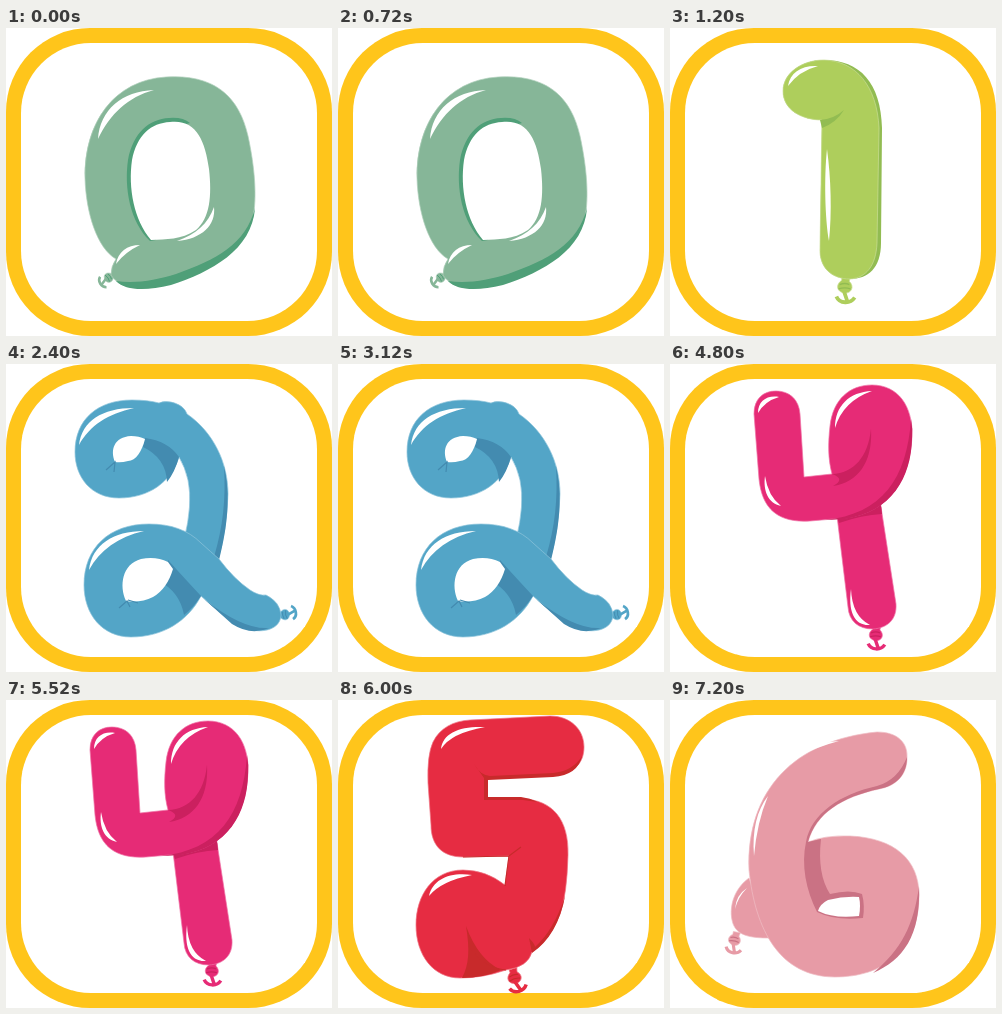
An HTML page for the animation above (8000 ms loop, 326 by 308 pixels).

```html
<!DOCTYPE html>
<html lang="en">
<head>
<meta charset="utf-8">
<title>Balloon digits</title>
<style>
  html, body { margin: 0; width: 100%; height: 100%; overflow: hidden; background: #fff; }
  svg { display: block; width: 326px; height: 308px; }
  .digit { display: none; fill: var(--c); stroke: color-mix(in srgb, var(--c), #fff 35%); stroke-width: .7; }
  .digit.on { display: inline; }
  .shade { fill: var(--d); stroke: none; }
  .white { fill: #fff; stroke: none; }
  .crease { fill: none; stroke: var(--d); stroke-width: 1.2; }
  .hook { fill: none; stroke: var(--c); stroke-width: 3.5; }
</style>
</head>
<body>
<svg viewBox="0 0 326 308">
  <defs>
    <g id="knot">
      <path d="M-3,0 H5 L4,4 C9,9 6,15 0,15 C-8,14 -9,7 -3,3 Z"/>
      <path class="crease" d="M-5,7 Q0,5 4,7 M-6,11 Q0,9 5,11"/>
      <path class="hook" d="M-1,13 L2,22 M-8,18 C-5,25 5,25 9,19"/>
    </g>
  </defs>
  <rect width="326" height="308" rx="84" fill="#ffc51b"/>
  <rect class="white" x="15" y="15" width="296" height="278" rx="70"/>

  <g class="digit" style="--c:#86b698;--d:#4f9f78">
    <use href="#knot" transform="translate(108 246) rotate(55) scale(.72)"/>
    <path d="M160,49 C208,46 233,68 242,108 C249,140 251,170 247,189 C239,222 200,244 165,255 C140,263 115,263 105,247 Q105,238 110,231 C91,220 80,185 79,150 C78,95 108,52 160,49Z"/>
    <path class="shade" d="M249,180 C246,222 205,244 165,257 C140,263 120,263 110,253 C130,256 150,252 170,246 C210,232 240,216 249,180Z"/>
    <path class="shade" d="M144,213 C124,194 118,160 122,132 C127,105 143,91 163,90 Q177,89 184,95 L160,102 L136,140 L150,212Z"/>
    <path class="white" d="M145,212 C128,192 122,160 126,132 C131,107 145,95 164,94 C190,91 199,112 203,141 C206,168 204,190 190,202 C175,212 160,211 145,212Z"/>
    <path class="white" d="M92,111 C94,82 116,63 148,62 C122,69 104,86 92,111Z M208,179 C210,197 196,211 171,213 C190,206 202,196 208,179Z M110,236 C112,224 121,217 134,217 Q119,224 110,236Z"/>
  </g>

  <g class="digit" style="--c:#aece5c;--d:#92bc52">
    <use href="#knot" transform="translate(175 249) scale(1.08)"/>
    <path class="shade" d="M152,92 C132,92 113,82 113,63 C113,45 132,32 154,32 C190,32 211,55 212,100 L211,215 C211,240 198,251 180,251 C162,251 149,240 150,220Z"/>
    <path d="M152,92 C132,92 113,82 113,63 C113,45 132,32 154,32 C186,33 207,58 209,100 L207,215 C206,238 196,250 180,251 C162,251 149,240 150,220Z"/>
    <path class="shade" d="M150,92 Q164,91 174,82 Q166,95 152,100Z"/>
    <path class="white" d="M118,58 C120,44 132,37 148,38 Q129,43 118,58Z M157,121 C161,150 162,185 159,213 C155,190 154,150 157,121Z"/>
  </g>

  <g class="digit" style="--c:#53a5c7;--d:#438bb0">
    <use href="#knot" transform="translate(272 252) rotate(-102) scale(.78)"/>
    <path d="M126,36 Q142,36 153,39 C162,35 178,40 181,50 C207,68 222,98 222,130 Q221,165 211,200 L178,176 Q187,140 182,116 Q179,103 173,93 C165,118 143,134 113,134 C85,134 69,113 69,88 C69,55 92,36 126,36Z"/>
    <path class="shade" d="M218,102 C226,138 219,172 213,196 L208,193 C217,163 220,135 218,102Z"/>
    <path d="M143,160 C165,160 182,166 195,179 Q205,188 213,195 Q228,215 244,226 Q253,232 260,231 Q274,238 275,251 C274,269 249,270 234,262 Q214,250 195,232 C182,257 157,273 125,273 C96,273 78,250 78,221 C78,184 103,160 143,160Z"/>
    <path class="shade" d="M139,74 Q162,77 173,93 Q169,108 161,118 Q160,94 137,83Z M162,196 Q180,216 195,232 Q187,244 178,251 Q174,228 153,217 Q162,208 162,196Z"/>
    <path class="shade" d="M198,235 Q237,266 263,264 Q245,272 226,260Z"/>
    <path class="white" d="M109,98 C104,86 108,73 125,72 Q133,72 139,75 C136,87 130,97 122,97 Q115,99 109,98Z M120,237 C113,222 116,200 135,195 Q150,192 162,198 L167,205 Q161,225 147,233 Q135,239 120,237Z"/>
    <path class="crease" d="M100,106 L109,98 L108,108 M113,244 L121,237 L124,243 M122,236 L132,239"/>
    <path class="white" d="M73,81 C76,57 96,44 128,44 C102,50 84,61 73,81Z M83,206 C86,181 107,167 138,167 C112,173 94,186 83,206Z"/>
  </g>

  <g class="digit" style="--c:#96d6e6;--d:#7bc9df">
    <use href="#knot" transform="translate(107 212) rotate(142) scale(.75)"/>
    <path d="M171,180 L206,137 C213,150 215,165 215,185 V205 C215,240 190,253 155,253 C125,253 102,243 102,223 C102,211 110,203 127,205 Q145,210 160,209 C170,208 171,202 171,180Z"/>
    <path class="shade" d="M110,240 C145,254 185,249 214,217 C206,244 184,253 155,253 Q124,252 110,240Z M170,179 L207,137 Q211,143 212,150 Q198,173 170,182Z"/>
    <path d="M125,93 C112,92 101,82 101,69 C101,52 118,42 150,42 C190,40 208,52 209,85 L207,130 C204,160 178,187 143,187 C120,187 106,172 106,152 C106,128 122,110 152,110 L164,111 C164,95 163,88 152,87 C142,87 136,93 125,93Z"/>
    <path class="shade" d="M207,70 Q210,85 207,130 C204,160 178,187 143,187 Q125,187 114,175 C150,192 195,170 204,128 Q207,100 207,70Z M139,144 Q158,140 169,123 Q162,143 139,144Z"/>
    <path class="white" d="M104,68 C105,53 119,46 142,47 Q116,51 104,68Z M111,141 C113,124 129,115 153,116 Q122,123 111,141Z M106,218 C110,206 124,204 140,210 Q119,210 106,218Z"/>
  </g>

  <g class="digit" style="--c:#e62b76;--d:#cb205f">
    <use href="#knot" transform="translate(206 262) scale(.98)"/>
    <path d="M167,152 L211,143 L226,240 C227,255 218,264 203,265 C188,265 179,257 178,243Z"/>
    <path class="shade" d="M167,152 L211,140 L212,150 Q192,151 169,159Z"/>
    <path d="M84,50 C84,35 93,27 106,27 C120,27 129,36 130,50 L134,113 L162,110 C158,95 158,80 160,62 C163,35 180,21 202,21 C228,21 243,42 242,72 C240,113 222,148 175,154 L140,157 C108,159 92,145 89,115Z"/>
    <path class="shade" d="M241,55 Q243,65 242,75 C241,113 222,148 175,155 L155,156 C212,150 237,115 241,55Z"/>
    <path class="shade" d="M162,110 C184,109 198,93 201,65 C203,99 187,119 163,122 Q176,115 162,110Z"/>
    <path class="white" d="M88,49 C88,37 97,31 109,33 Q95,37 88,49Z M165,64 C165,42 179,28 202,27 Q173,37 165,64Z M95,112 Q98,132 111,142 C98,139 93,127 95,112Z M181,225 Q182,252 200,261 C184,262 178,247 181,225Z"/>
  </g>

  <g class="digit" style="--c:#e62c42;--d:#c82a2b">
    <use href="#knot" transform="translate(174 269) rotate(-17)"/>
    <path d="M132,20 L212,16 C232,16 246,29 246,47 C246,65 234,74 215,75 L148,78 V99 H185 C215,100 231,120 230,155 Q229,195 222,214 Q212,240 194,252 Q190,267 168,270 Q145,278 122,278 C95,278 78,255 78,225 C78,195 95,170 125,170 Q148,170 167,185 L171,156 L125,157 C105,157 93,146 93,125 L90,83 Q89,55 95,42 C102,28 115,21 132,20Z"/>
    <path class="shade" d="M136,64 Q142,75 152,76 L215,73 Q235,71 244,56 Q240,75 215,77 L150,80 V97 H183 Q192,98 200,102 Q192,101 185,100 H146 V78Z"/>
    <path class="shade" d="M128,226 C132,250 131,265 124,278 Q145,278 163,270 Q140,259 128,226Z M227,196 Q220,235 194,253 L191,238 Q197,244 197,247 Q216,230 227,196Z"/>
    <path class="crease" d="M125,157 L171,156 L183,147 M171,156 L167,186 M134,250 Q147,268 168,270"/>
    <path class="white" d="M103,49 C105,33 121,26 147,27 Q113,33 103,49Z M91,196 C95,179 112,172 134,175 Q103,181 91,196Z"/>
  </g>

  <g class="digit" style="--c:#e79ba6;--d:#ca7284">
    <use href="#knot" transform="translate(66 232) rotate(10) scale(.9)"/>
    <path d="M79,178 C65,188 59,205 62,220 C65,236 80,238 100,238Z"/>
    <path d="M207,32 C228,32 238,43 237,58 C237,75 226,86 209,89 C172,97 146,113 138,142 Q155,135 180,136 C225,138 249,160 249,195 C249,252 212,277 165,277 C110,277 85,230 79,170 C76,90 125,40 207,32Z"/>
    <path class="shade" d="M237,57 C237,75 226,86 209,89 C172,97 146,113 138,142 L151,139 Q147,174 160,194 Q180,189 192,194 Q195,205 193,218 Q165,221 147,212 C136,190 131,165 136,142 C141,114 170,94 207,86 Q228,80 237,57Z M249,186 C251,236 233,260 203,273 C231,250 244,225 249,186Z"/>
    <path class="white" d="M148,211 Q150,204 158,200 Q174,196 189,197 Q191,206 189,216 Q164,219 148,211Z"/>
    <path class="white" d="M100,78 C114,55 139,43 169,41 Q124,53 100,78Z M84,156 C82,130 87,110 98,96 Q87,122 84,156Z M65,209 Q66,195 77,188 Q68,197 65,209Z"/>
  </g>
</svg>
<script>
  const LOOP = 8000, HOLD = 1200;
  const digits = document.querySelectorAll('.digit');

  function draw() {
    const current = Math.floor(performance.now() % LOOP / HOLD);
    digits.forEach((digit, i) => digit.classList.toggle('on', i === current));
    requestAnimationFrame(draw);
  }
  draw();
</script>
</body>
</html>
```
